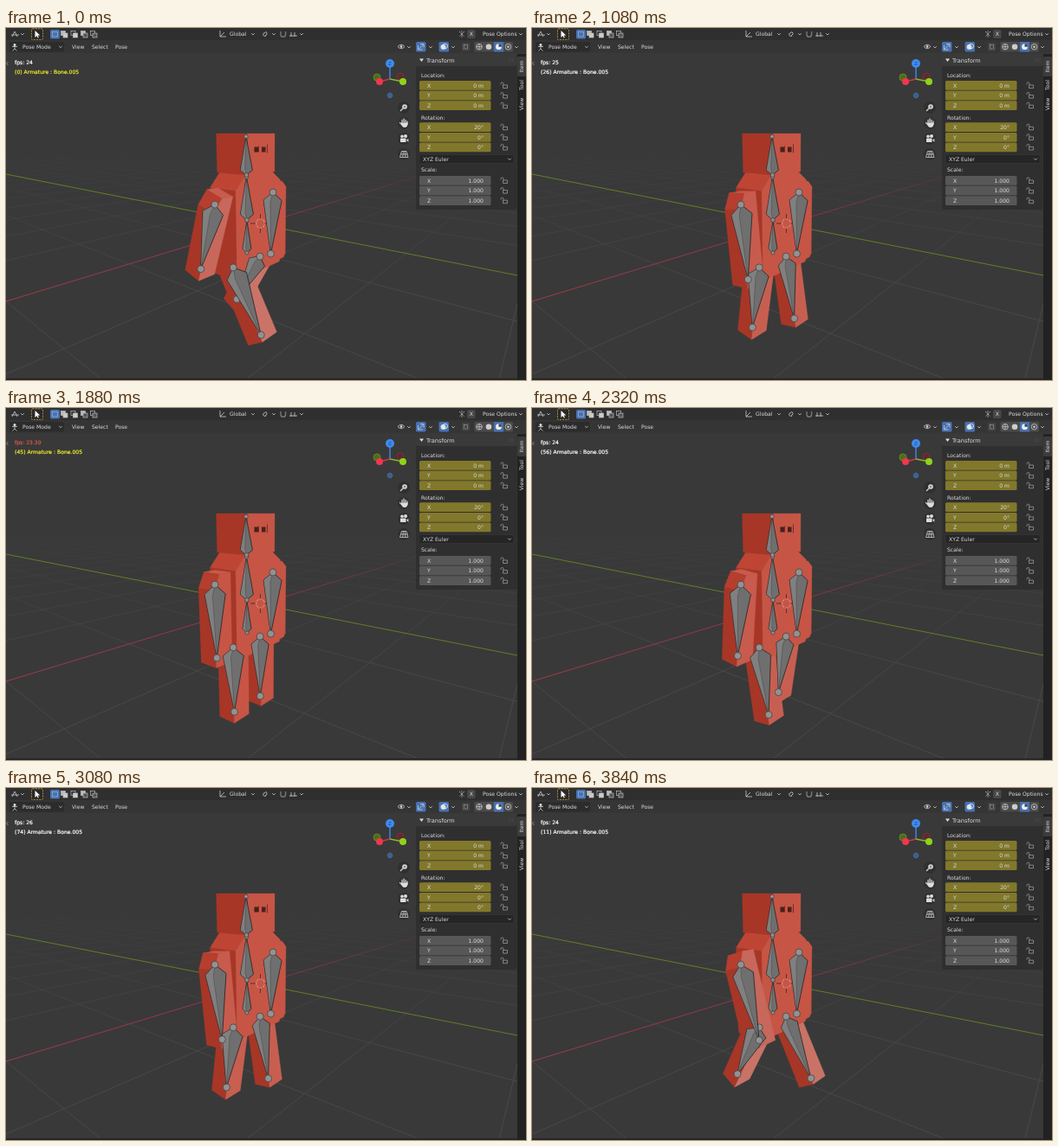
Write an HTML page that moves like this. It is 600 px wide and 407 px high and loops after 3880 ms.

```html
<!DOCTYPE html>
<html lang="en">
<head>
<meta charset="utf-8">
<title>Walk cycle</title>
<style>
html, body { margin: 0; width: 100%; height: 100%; overflow: hidden; background: #393939; }
svg { display: block; font: 6.1px "DejaVu Sans", sans-serif; fill: #ddd; }
.line { fill: none; stroke: #ccc; stroke-width: .8; }
.status { fill: currentColor; stroke: currentColor; stroke-width: .2; }
</style>
</head>
<body>
<svg width="600" height="407" viewBox="0 0 600 407">
  <defs>
    <linearGradient id="fade" gradientUnits="userSpaceOnUse" x1="0" y1="140" x2="0" y2="320">
      <stop stop-color="#4b4b4b" stop-opacity="0"/><stop offset="1" stop-color="#4b4b4b"/>
    </linearGradient>
    <linearGradient id="red" gradientUnits="userSpaceOnUse" x1="0" y1="0" x2="520" y2="0">
      <stop stop-color="#a03a4c"/><stop offset=".6" stop-color="#8a3645"/><stop offset="1" stop-color="#393939"/>
    </linearGradient>
  </defs>
  <rect width="600" height="407" fill="#393939"/>
  <path id="grid" fill="none" stroke="url(#fade)" stroke-width=".8"/>
  <path d="M0 316L520 158" stroke="url(#red)"/>
  <path d="M0 169L590 286" stroke="#617f26"/>
  <g id="body"></g>
  <g id="cursor" fill="none">
    <path d="M293.5 215v7M293.5 230v7M282 226h7M298 226h7" stroke="#3a2a28" stroke-width=".8"/>
    <circle cx="293.5" cy="226" r="5" stroke="#e8d5d0" stroke-width=".9"/>
    <circle cx="293.5" cy="226" r="5" stroke="#d8452c" stroke-dasharray="2.6 1.4"/>
  </g>
  <g id="bones" stroke="#222" stroke-width=".8" stroke-linejoin="round"></g>
  <g id="ui"></g>
  <text id="fps" class="status" x="10" y="41.5"></text>
  <text id="bone" class="status" x="10" y="52.8"></text>
</svg>
<script>
const $ = id => document.getElementById(id);

// Camera space axes of the world: lateral, forward and down.
const LATERAL = [.622, -.149, .768], FORWARD = [.784, .118, -.609], DOWN = [0, .982, .19];
const ORIGIN = [-7, 23, 417], FOCAL = 417;

function project(r, f, d) {
  const [x, y, z] = ORIGIN.map((o, i) => o + r * LATERAL[i] + f * FORWARD[i] + d * DOWN[i]);
  return [300 + FOCAL * x / z, 203 + FOCAL * y / z];
}

// Swings a point about the lateral axis at height `pivot`.
function swung(r, f, d, pivot, angle) {
  const s = Math.sin(angle), c = Math.cos(angle), l = d - pivot;
  return project(r, f * c + l * s, pivot + l * c - f * s);
}

const points = list => list.map(p => p.map(v => v.toFixed(2)).join()).join(' ');

// Brighter faces are also less saturated.
function face(list, light) {
  const area = list.reduce((sum, [x, y], i) => {
    const [u, v] = list[(i + 1) % list.length];
    return sum + x * v - u * y;
  }, 0);
  if (area <= 0) return '';
  const color = `hsl(7 ${92 - 37 * light}% ${50 * light}%)`;
  return `<polygon points="${points(list)}" fill="${color}" stroke="${color}" stroke-width=".3"/>`;
}

// A clockwise (lateral, down) profile extruded along the forward axis.
function prism(profile, depth, pivot = 0, angle = 0) {
  const front = profile.map(([r, d]) => swung(r, depth, d, pivot, angle));
  const back = profile.map(([r, d]) => swung(r, -depth, d, pivot, angle));
  const sides = profile.map(([r, d], i) => {
    const j = (i + 1) % profile.length;
    const dr = profile[j][0] - r, dd = profile[j][1] - d;
    const light = .92 + (.11 * dd + .16 * dr) / Math.hypot(dr, dd);
    return face([back[i], back[j], front[j], front[i]], light);
  });
  return sides.join('') + face(front, 1.05 + .3 * Math.abs(Math.sin(angle)));
}

const box = (r0, r1, d0, d1) => [[r0, d0], [r1, d0], [r1, d1], [r0, d1]];
const HEAD = box(-45, -1, -102, -61.5);
const TORSO = [[-45, -61.5], [-1, -61.5], [14, -51], [14, 46], [-59, 46], [-59, -47]];
const NEAR_ARM = [[-74, -45], [-59, -45], [-59, 48], [-81.5, 48], [-81.5, -30]];
const FAR_ARM = [[10, -51], [28, -47], [35.5, -40], [35.5, 43], [32, 47], [14, 48]];
const NEAR_LEG = box(-57.5, -33.5, 34, 120);
const FAR_LEG = box(-12, 12, 34, 120);

function ball([x, y], r) {
  return `<circle cx="${x}" cy="${y}" r="${r}" fill="#929292" stroke="#444"/>`;
}

function drawBone(base, tip, half, r = 4) {
  const dx = tip[0] - base[0], dy = tip[1] - base[1], len = Math.hypot(dx, dy);
  const at = (along, across) =>
    [base[0] + dx * along - dy / len * across, base[1] + dy * along + dx / len * across];
  const facet = (a, b, fill) => `<polygon points="${points([base, at(.13, a), tip, at(.13, b)])}" fill="${fill}"/>`;
  const upward = dy < 0 ? -1 : 1;
  return facet(-half, half, '#6f6f6f') +
    `<polygon points="${points([base, at(.13, half * upward), tip, at(.16, half * upward * .25)])}" fill="#808080" stroke-width=".3"/>` +
    ball(base, r) + ball(tip, r);
}

function pose(frame) {
  const swing = Math.cos(frame * Math.PI / 10);
  const leg = .53 * swing, arm = -.32 * swing;
  $('body').innerHTML =
    prism(FAR_LEG, 11, 40, -leg) + prism(NEAR_LEG, 11, 40, leg) +
    prism(FAR_ARM, 11) + prism(TORSO, 18) + prism(HEAD, 21.5) +
    '<path d="M286.5 137.5h5v6h-5zM295 137.5h4.5v6h-4.5z" fill="#47211c"/>' +
    '<path d="M301.5 134.5v10M291.5 136.5v7" stroke="#7a2b22"/>' +
    prism(NEAR_ARM, 11, -33, arm);
  $('bones').innerHTML =
    drawBone(project(0, 0, 40), swung(0, 0, 116, 40, -leg), 10) +
    drawBone([278, 260], [278, 223], 5, 2) +
    drawBone([278, 222], [277.5, 172], 7.5, 2.3) +
    drawBone([277.5, 170], [277, 125.5], 7, 2.3) +
    drawBone([308, 190], [305.5, 261], 10.5) +
    drawBone(project(-45.5, 0, 40), swung(-45.5, 0, 116, 40, leg), 12) +
    drawBone(project(-70, 0, -33), swung(-70, 0, 44, -33, arm), 12);
}

function drawGrid() {
  const unit = FOCAL / 5;
  let d = '';
  for (let n = -20; n <= 20; n++) {
    if (!n) continue;
    const k = n * unit;
    d += `M${project((.609 * k - 390) / .768, k, 0)}L${project(6000, k, 0)}`;
    d += `M${project(k, (390 + .768 * k) / .609, 0)}L${project(k, -6000, 0)}`;
  }
  $('grid').setAttribute('d', d);
}

const rect = (x, y, w, h, fill, r = 0, more = '') =>
  `<rect x="${x}" y="${y}" width="${w}" height="${h}" rx="${r}" fill="${fill}" ${more}/>`;
const text = (x, y, s, more = '') => `<text x="${x}" y="${y}" ${more}>${s}</text>`;
const line = (d, more = '') => `<path class="line" d="${d}" ${more}/>`;
const dot = (x, y, r, fill, more = '') => `<circle cx="${x}" cy="${y}" r="${r}" fill="${fill}" ${more}/>`;
const chevron = (x, y) => line(`M${x - 1.8} ${y - .8}l1.8 1.8 1.8-1.8`);

function fields(y, values, fill) {
  return values.map((v, i) => {
    const top = y + i * 11.6;
    return rect(477, top, 82.5, 10.8, fill, 1.5) +
      text(486, top + 7.6, 'XYZ'[i]) + text(551, top + 7.6, v, 'text-anchor="end"') +
      line(`M574 ${top + 5}v-1.6a1.5 1.5 0 0 0-3 0v1M573.5 ${top + 5}h5v3.5h-5z`, 'style="stroke:#999"');
  }).join('');
}

function panel() {
  const tab = (y, s) => text(0, 0, s, `transform="translate(597.3 ${y}) rotate(-90)" text-anchor="middle"`);
  return rect(473, 30, 116.5, 180, '#2f2f2f', 2) + rect(473, 30, 116.5, 14, '#3a3a3a', 2) +
    '<path d="M477 35.5h5l-2.5 3.5z"/>' + text(485, 39.8, 'Transform', 'font-size="6.6"') +
    line('M580 36h6M580 38h6', 'stroke-dasharray="1" style="stroke:#555"') +
    text(479, 57, 'Location:') + fields(61, ['0 m', '0 m', '0 m'], '#81782b') +
    text(479, 105.5, 'Rotation:') + fields(109.3, ['20°', '0°', '0°'], '#81782b') +
    rect(477, 146.5, 109, 10, '#252525', 1.5, 'stroke="#3d3d3d" stroke-width=".5"') +
    text(481, 153.8, 'XYZ Euler') + chevron(581, 151.5) +
    text(479, 166.3, 'Scale:') + fields(171, ['1.000', '1.000', '1.000'], '#575757') +
    rect(590, 30, 10, 377, '#222') + rect(590, 33, 10, 23, '#3b3b3b', 1.5) +
    tab(44.5, 'Item') + tab(66, 'Tool') + tab(88, 'View');
}

function headers() {
  const blue = '#4772b3';
  let s = rect(0, 0, 600, 14, '#2f2f2f') + rect(0, 14, 600, 14.5, '#353535');
  s += line('M7 10l3-6 3 6M6 8h9') + chevron(19, 7);
  s += rect(29.5, .8, 13, 12.6, '#292929', 1, 'stroke="#d9a441" stroke-width=".8" stroke-dasharray="2 1.2"');
  s += '<path d="M33.5 3v8l2-2 1.3 2.6 1-.6-1.1-2.4h2.6z" fill="#fff"/>';
  s += rect(51, 2, 11, 10.5, blue, 1.5) + line('M53.5 4.5h6v5.5h-6z', 'stroke-dasharray="1.2 .8"');
  [67, 78.5, 90, 101].forEach((x, i) => {
    s += rect(x - 3.5, 3.5, 5, 5, i % 2 ? 'none' : '#bbb', 0, 'stroke="#bbb" stroke-width=".7"') +
      rect(x - 1, 6, 5, 5, i < 2 ? '#ccc' : '#555', 0, 'stroke="#bbb" stroke-width=".7"');
  });
  s += line('M247 3v7h7M247 10l5-5') + text(258, 9.2, 'Global') + chevron(285, 7);
  s += line('M299 5.5a2 2 0 1 0 1 3.5M299 8.5a2 2 0 1 0 0-4') + chevron(309, 7);
  s += line('M317 4v3.5a2.8 2.8 0 0 0 5.6 0V4', 'style="stroke:#777;stroke-width:1.4"');
  s += line('M327 9h9M329 5v5M333 5v5') + chevron(341, 7);
  s += line('M523 4l6 6M529 4l-6 6M526 3v8', 'stroke-dasharray="1.4 .7"') + rect(532, 2, 9.5, 10, '#484848', 1.5);
  s += text(534.7, 9.2, 'X') + text(550, 9.2, 'Pose Options') + chevron(594, 7);

  s += rect(4, 16, 63, 11.5, '#2c2c2c', 1.5) + dot(10, 19.5, 1.5, '#ddd') + line('M7 21.5h6M10 21v3l-2.5 2.5M10 24l2.5 2.5');
  s += text(19, 24, 'Pose Mode') + chevron(63, 21.7);
  s += text(76, 24, 'View') + text(99, 24, 'Select') + text(126, 24, 'Pose');
  s += line('M452 21.5q4-4.5 8 0q-4 4.5-8 0') + dot(456, 21.5, 1.3, '#ddd') + chevron(465, 22);
  s += rect(473, 16, 11.5, 11.5, blue, 1.5) + line('M475.5 25l6-6M478 18.5h4v4M475.5 20v5h5') + chevron(490, 22);
  s += rect(499.5, 16, 11.5, 11.5, blue, 1.5) + dot(504.5, 22, 3, '#ddd') + dot(506.7, 21, 2.8, 'none', 'stroke="#fff" stroke-width=".7"') + chevron(516, 22);
  s += rect(526, 17, 9, 9.5, '#444', 1) + line('M528.5 19.5h4v4.5h-4z', 'stroke-dasharray="1"');
  s += rect(540.5, 16, 44.5, 11.5, '#4b4b4b', 1.5) + rect(563, 16, 11, 11.5, blue);
  s += dot(546, 21.7, 3.3, 'none', 'class="line"') + line('M542.7 21.7h6.6M546 18.4v6.6');
  s += dot(557, 21.7, 3.3, '#ccc') + dot(568.5, 21.7, 3.4, '#eee') + '<path d="M568.5 21.7v-3.4a3.4 3.4 0 0 1 3.4 3.4z" fill="#345"/>';
  s += dot(579.5, 21.7, 3.3, 'none', 'class="line"') + dot(579.5, 21.7, 1.3, '#ccc') + chevron(589, 22);
  return s;
}

function viewTools() {
  let s = dot(428, 57, 4, '#4f6a1e', 'stroke="#6f961f" stroke-width=".8"') +
    dot(455, 56, 4, '#5b2a32', 'stroke="#8e303c" stroke-width=".8"') +
    line('M443 59V44', 'style="stroke:#3b83e8;stroke-width:1.5"') +
    line('M443 59l-12 3', 'style="stroke:#d0364a;stroke-width:1.3"') +
    line('M443 59l15 3', 'style="stroke:#86bb22;stroke-width:1.3"');
  s += dot(431, 62, 4, '#f0374d') + dot(458, 62, 4, '#8fd21a') + dot(443, 41, 5, '#3d8bf2');
  s += text(443, 43, 'Z', 'text-anchor="middle" font-size="5" fill="#1b3f73"');
  s += dot(443, 78, 2.8, '#3a5f92', 'stroke="#4d7fc0" stroke-width=".9" stroke-dasharray="1.6 .8"');
  [92, 110, 128, 146].forEach(y => s += dot(459, y, 7, '#303030'));
  s += dot(460, 91, 2.8, '#ddd') + line('M458 93l-3 3', 'style="stroke-width:1.5"') + line('M458.7 91h2.6M460 89.7v2.6', 'style="stroke:#333;stroke-width:.6"');
  s += line('M457 110v-3.5M459 109v-4M461 110v-3.5M463 111v-3M456.5 111.5l-2-2', 'style="stroke-width:1.3" stroke-linecap="round"') +
    '<path d="M456 109.5h7.6v2q-1 3.5-3.6 3.5t-4-3.5z"/>';
  s += dot(457, 125.2, 1.8, '#ddd') + dot(461, 125, 2, '#ddd') + rect(455, 127.5, 6.5, 4.5, '#ddd', .6) + '<path d="M462 129.5l2.3-1.6v4z"/>';
  s += line('M456.5 142.5h5.5l2 7h-9.5zM455.5 146h8M458.5 142.5l-.8 7M460.2 142.5l.8 7');
  s += line('M2.5 39l-2 2 2 2', 'style="stroke:#999"');
  return s + rect(0, 405, 590, 2, '#262626');
}

// [step, reading]
const RATES = [[0, '24'], [8, '25'], [44, '23.39'], [53, '24'], [62, '26'], [79, '23.16'], [90, '24']];

function show(id, content, color) {
  $(id).textContent = content;
  $(id).style.color = color;
}

function draw(now) {
  const step = Math.floor(now % 3880 / 40);
  const frame = Math.floor(step * .96 + .81) % 81;
  const rate = RATES.filter(([from]) => from <= step).pop()[1];
  pose(frame);
  show('fps', 'fps: ' + rate, rate < 24 ? '#dc5650' : '#fff');
  show('bone', `(${frame}) Armature : Bone.005`, frame % 5 ? '#fff' : '#f0f02a');
}

drawGrid();
$('ui').innerHTML = headers() + panel() + viewTools();
let start;
function tick(now) {
  start ??= now;
  draw(now - start);
  requestAnimationFrame(tick);
}
draw(0);
requestAnimationFrame(tick);
</script>
</body>
</html>
```
